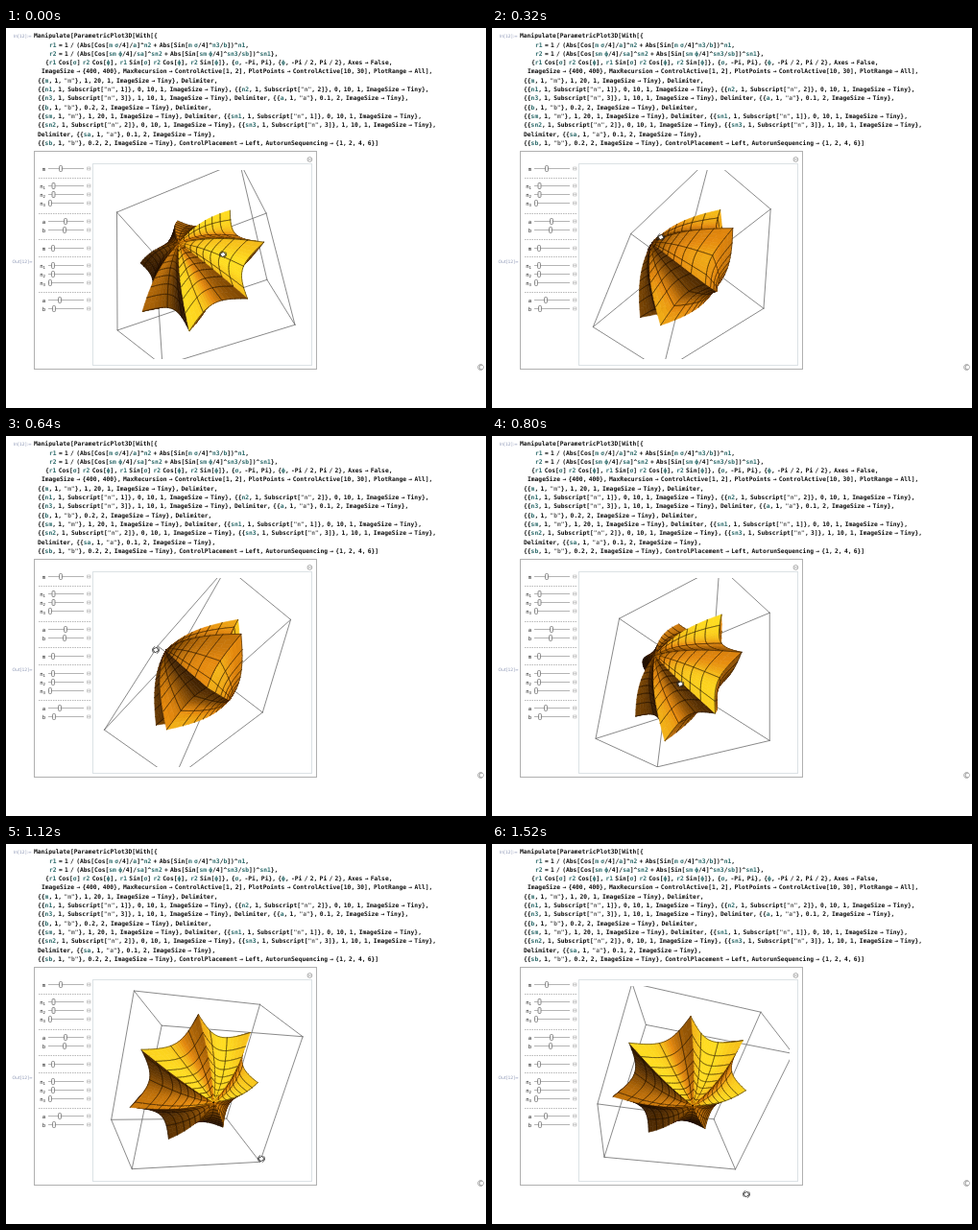
An HTML page with a canvas for the animation above (1.6 s loop, 500 by 396 pixels).

```html
<!DOCTYPE html>
<html lang="en">
<head>
<meta charset="utf-8">
<title>Superformula surface</title>
<style>
  html, body { margin: 0; width: 100%; height: 100%; overflow: hidden; background: #fff; }
  svg, canvas { position: absolute; left: 0; top: 0; width: 500px; height: 396px; }
  .code { font: bold 6.3px "DejaVu Sans Mono", monospace; word-spacing: -1.5px; fill: #111; }
  .var { fill: #2c6a6a; }
  .str { fill: #5c5c5c; }
  .cell { font: 4.5px "DejaVu Sans", sans-serif; fill: #8c96b4; }
  .label { font: 5.6px "DejaVu Sans Mono", monospace; fill: #222; text-anchor: end; }
  .sub { font-size: 4px; }
  .mark { font: 8.5px "DejaVu Sans", sans-serif; fill: #666; }
</style>
</head>
<body>
<svg id="ui" viewBox="0 0 500 396"></svg>
<canvas id="view" width="500" height="396"></canvas>
<script>
const LINES = [
  [29, 'Manipulate[ParametricPlot3D[With[{'],
  [45, 'r1 = 1 / (Abs[Cos[m σ/4]/a]^n2 + Abs[Sin[m σ/4]^n3/b])^n1,'],
  [45, 'r2 = 1 / (Abs[Cos[sm ϕ/4]/sa]^sn2 + Abs[Sin[sm ϕ/4]^sn3/sb])^sn1},'],
  [41, '{r1 Cos[σ] r2 Cos[ϕ], r1 Sin[σ] r2 Cos[ϕ], r2 Sin[ϕ]}, {σ, -Pi, Pi}, {ϕ, -Pi / 2, Pi / 2}, Axes → False,'],
  [37, 'ImageSize → {400, 400}, MaxRecursion → ControlActive[1, 2], PlotPoints → ControlActive[10, 30], PlotRange → All],'],
  [33, '{{m, 1, "m"}, 1, 20, 1, ImageSize → Tiny}, Delimiter,'],
  [33, '{{n1, 1, Subscript["n", 1]}, 0, 10, 1, ImageSize → Tiny}, {{n2, 1, Subscript["n", 2]}, 0, 10, 1, ImageSize → Tiny},'],
  [33, '{{n3, 1, Subscript["n", 3]}, 1, 10, 1, ImageSize → Tiny}, Delimiter, {{a, 1, "a"}, 0.1, 2, ImageSize → Tiny},'],
  [33, '{{b, 1, "b"}, 0.2, 2, ImageSize → Tiny}, Delimiter,'],
  [33, '{{sm, 1, "m"}, 1, 20, 1, ImageSize → Tiny}, Delimiter, {{sn1, 1, Subscript["n", 1]}, 0, 10, 1, ImageSize → Tiny},'],
  [33, '{{sn2, 1, Subscript["n", 2]}, 0, 10, 1, ImageSize → Tiny}, {{sn3, 1, Subscript["n", 3]}, 1, 10, 1, ImageSize → Tiny},'],
  [33, 'Delimiter, {{sa, 1, "a"}, 0.1, 2, ImageSize → Tiny},'],
  [33, '{{sb, 1, "b"}, 0.2, 2, ImageSize → Tiny}, ControlPlacement → Left, AutorunSequencing → {1, 2, 4, 6}]']
];

// label, row, thumb position
const SLIDERS = [
  ['m', 147, 57], ['n1', 165, 49.5], ['n2', 174, 49.5], ['n3', 183, 46], ['a', 202, 62], ['b', 211, 61],
  ['m', 230, 49], ['n1', 248, 49], ['n2', 257, 49], ['n3', 266, 46], ['a', 284, 56], ['b', 293, 50]
];

const tint = s => s.replace(/"\w"|\b[rmnabs]+\d?\b|[σϕ]/g,
  w => `<tspan class="${w[0] === '"' ? 'str' : 'var'}">${w}</tspan>`);

const slider = ([name, y, x]) => `
  <text class="label" x="41" y="${y + 1.5}">${name[0]}<tspan class="sub" dy="1">${name[1] || ''}</tspan></text>
  <path d="M44 ${y - 0.5}H81" stroke="#b4b4b4"/>
  <rect x="${x - 1.5}" y="${y - 3.5}" width="3" height="6" rx="1" fill="#f4f4f4" stroke="#777" stroke-width=".8"/>
  <path d="M84.5 ${y - 2}h3.5v3h-3.5zM84.5 ${y - 0.5}h3.5" fill="none" stroke="#b4b4b4" stroke-width=".6"/>`;

document.getElementById('ui').innerHTML = `
  <text class="cell" x="8" y="10">In[12]:=</text>
  <text class="cell" x="6.5" y="244.5">Out[12]=</text>
  ${LINES.map(([x, s], i) => `<text class="code" x="${x}" y="${10.2 + i * 9.3}">${tint(s)}</text>`).join('')}
  <rect x="29.5" y="128.5" width="294" height="227" fill="#fff" stroke="#b0b0b0"/>
  <rect x="90.5" y="141.5" width="228" height="210" fill="#fff" stroke="#b9c4cb" stroke-dasharray="1 1"/>
  <g stroke="#b8b8b8" stroke-dasharray="1.5 1">
    ${[156, 193, 220, 238, 275].map(y => `<path d="M34 ${y}.5H88"/>`).join('')}
  </g>
  ${SLIDERS.map(slider).join('')}
  <path d="M314 137a2.4 2.4 0 1 1 4.8 0a2.4 2.4 0 1 1-4.8 0M315 137h2.8" fill="none" stroke="#888" stroke-width=".7"/>
  <text class="mark" x="490.3" y="357">©</text>`;

const ctx = document.getElementById('view').getContext('2d');
const STEP = 80, LOOP = 1600;
const CX = 202.5, CY = 247, SCALE = 74, DIST = 6.9, SHIFT = 0.05;
const HALF = [0.988, 1.014, 0.6];
const NU = 112, NV = 32;
const LIGHT = [0.5, 0.25, 0.83];
const SHADES = [[-0.2, 45, 22, 0], [0.45, 150, 86, 5], [0.72, 230, 138, 15], [0.97, 255, 220, 32]];

// time, pointer, x axis and z axis of the surface as seen by the viewer
const POSES = [
  [0, 226, 236, 0.91, 0.33, 0.272, -0.41, 0.52, 0.752],
  [320, 176, 218, 0.64, 0.5, 0.596, -0.745, 0.55, 0.327],
  [640, 156, 223, 0.549, 0.527, 0.65, -0.781, 0.596, 0.176],
  [960, 249, 306, 0.967, -0.05, 0.25, -0.25, 0.03, 0.967],
  [1120, 266, 328, 0.9, -0.02, -0.442, 0.37, -0.475, 0.797],
  [1360, 267, 350, 0.91, -0.09, -0.404, 0.29, -0.535, 0.791],
  [1520, 265, 365, 0.92, -0.14, -0.364, 0.22, -0.555, 0.8]
];

const mix = (a, b, k) => a.map((v, i) => v + (b[i] - v) * k);
const sub = (a, b) => a.map((v, i) => v - b[i]);
const dot = (a, b) => a[0] * b[0] + a[1] * b[1] + a[2] * b[2];
const cross = (a, b) => [a[1] * b[2] - a[2] * b[1], a[2] * b[0] - a[0] * b[2], a[0] * b[1] - a[1] * b[0]];
const unit = a => { const n = Math.hypot(...a) || 1; return a.map(v => v / n); };
const superR = (m, angle, k) => 1 / (Math.abs(Math.cos(m * angle / 4)) + k * Math.abs(Math.sin(m * angle / 4)));

const mesh = [];
for (let i = 0; i <= NU; i++) {
  const u = i / NU * 2 * Math.PI, r1 = superR(7, u, 1);
  mesh.push([]);
  for (let j = 0; j <= NV; j++) {
    const v = (j / NV - 0.5) * Math.PI, r2 = superR(3, v, 1.46), flat = r1 * r2 * Math.cos(v);
    mesh[i].push([flat * Math.cos(u) - SHIFT, flat * Math.sin(u), r2 * Math.sin(v)]);
  }
}

// The drag slows to a stop where it reverses, so the curve never overshoots a pose.
function glide(n, c, t) {
  const slope = i => (POSES[i + 1][c] - POSES[i][c]) / (POSES[i + 1][0] - POSES[i][0]);
  const speed = i => {
    const s = slope(Math.max(0, i - 1)), e = slope(Math.min(POSES.length - 2, i));
    return s * e > 0 ? 2 * s * e / (s + e) : 0;
  };
  const a = POSES[n], b = POSES[n + 1], span = b[0] - a[0], k = (t - a[0]) / span;
  const ease = k * k * (3 - 2 * k);
  return a[c] + (b[c] - a[c]) * ease + span * k * (1 - k) * (speed(n) * (1 - k) - speed(n + 1) * k);
}

function poseAt(t) {
  let n = 0;
  while (n < POSES.length - 2 && POSES[n + 1][0] <= t) n++;
  const part = (...cols) => cols.map(c => glide(n, c, t));
  const z = unit(part(6, 7, 8)), x0 = part(3, 4, 5), d = dot(x0, z);
  const x = unit(x0.map((v, i) => v - d * z[i]));
  return { pointer: part(1, 2), axes: [x, cross(z, x), z] };
}

function shade(s) {
  let n = 0;
  while (n < SHADES.length - 2 && SHADES[n + 1][0] < s) n++;
  const a = SHADES[n], b = SHADES[n + 1];
  const k = Math.max(0, Math.min(1, (s - a[0]) / (b[0] - a[0])));
  return `rgb(${mix(a, b, k).slice(1).map(Math.round)})`;
}

const turn = (p, e) => [0, 1, 2].map(i => p[0] * e[0][i] + p[1] * e[1][i] + p[2] * e[2][i]);

function project(p) {
  const k = SCALE * DIST / (DIST - p[2]);
  return [CX + p[0] * k, CY - p[1] * k];
}

function stroke(points, color, width) {
  ctx.beginPath();
  points.forEach(p => ctx.lineTo(...p));
  ctx.strokeStyle = color;
  ctx.lineWidth = width;
  ctx.stroke();
}

function drawBox(axes) {
  for (let a = 0; a < 3; a++) {
    const b = (a + 1) % 3, c = (a + 2) % 3;
    for (const sb of [-1, 1]) for (const sc of [-1, 1]) {
      const ends = [-1, 1].map(sa => {
        const p = [];
        p[a] = sa * HALF[a]; p[b] = sb * HALF[b]; p[c] = sc * HALF[c];
        return project(turn(p, axes));
      });
      stroke(ends, '#6c6c6c', 0.8);
    }
  }
}

function drawSurface(axes) {
  const pts = mesh.map(row => row.map(p => turn(p, axes)));
  const quads = [];
  for (let i = 0; i < NU; i++) for (let j = 0; j < NV; j++) {
    const q = [pts[i][j], pts[i + 1][j], pts[i + 1][j + 1], pts[i][j + 1]];
    const n = unit(cross(sub(q[2], q[0]), sub(q[3], q[1])));
    if (dot(n, sub([0, 0, DIST], q[0])) > 0)
      quads.push({ i, j, q, n, z: q[0][2] + q[1][2] + q[2][2] + q[3][2] });
  }
  quads.sort((a, b) => a.z - b.z);
  for (const { i, j, q, n } of quads) {
    const s = q.map(project), color = shade(dot(n, LIGHT));
    ctx.fillStyle = color;
    stroke([...s, s[0]], color, 0.6);
    ctx.fill();
    const line = (a, b) => stroke([s[a], s[b]], 'rgba(25,12,0,.8)', 0.65);
    if (i % 7 === 0) line(0, 3);
    if (i % 7 === 6) line(1, 2);
    if (j % 2) line(3, 2); else line(0, 1);
  }
}

function drawPointer([x, y]) {
  ctx.save();
  ctx.translate(x, y);
  ctx.rotate(-0.5);
  ctx.fillStyle = '#fff';
  ctx.strokeStyle = '#222';
  ctx.lineWidth = 0.7;
  ctx.beginPath();
  ctx.rect(-2.2, -2, 4.4, 4);
  ctx.fill();
  ctx.moveTo(-3.6, 1); ctx.quadraticCurveTo(-3.6, -3.6, 1, -3.6);
  ctx.moveTo(3.6, -1); ctx.quadraticCurveTo(3.6, 3.6, -1, 3.6);
  ctx.stroke();
  ctx.restore();
}

function draw(t) {
  const { axes, pointer } = poseAt(t);
  ctx.clearRect(0, 0, 500, 396);
  ctx.save();
  ctx.beginPath();
  ctx.rect(99, 148, 211, 197);
  ctx.clip();
  ctx.lineCap = ctx.lineJoin = 'round';
  drawBox(axes);
  drawSurface(axes);
  ctx.restore();
  drawPointer(pointer);
}

let shown = -1;
function tick() {
  const step = Math.floor(performance.now() % LOOP / STEP);
  if (step !== shown) draw((shown = step) * STEP);
  requestAnimationFrame(tick);
}
tick();
</script>
</body>
</html>
```
